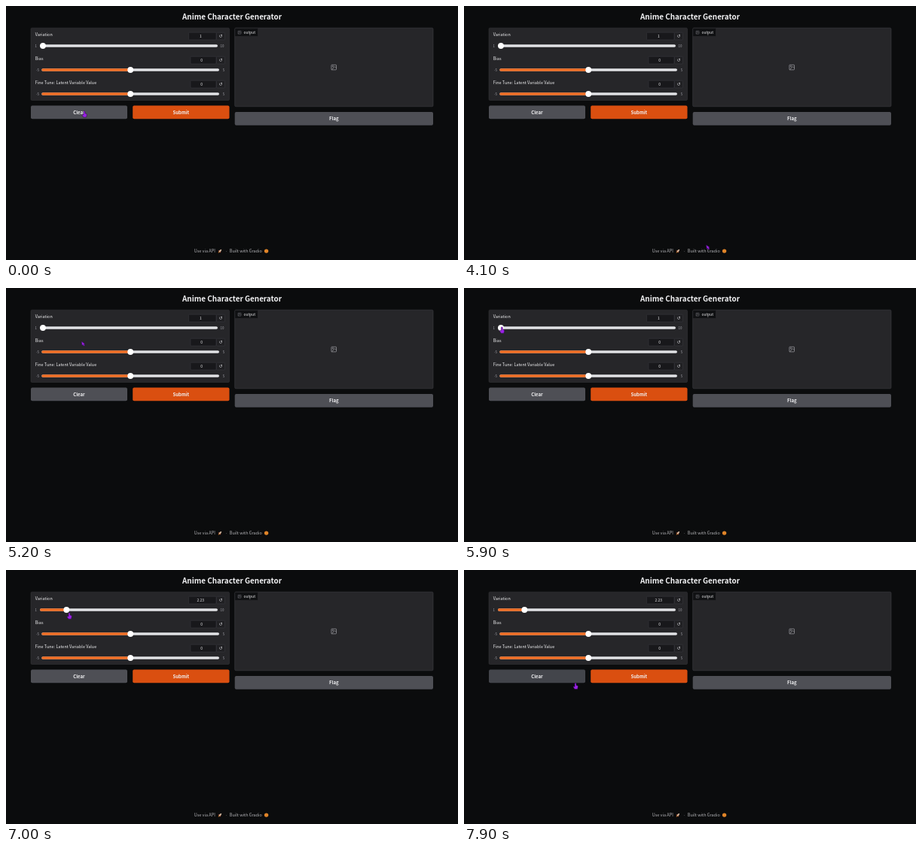
An HTML page for the animation above (8 s loop, 600 px wide and 338 px high).

```html
<!DOCTYPE html>
<html lang="en">
<head>
<meta charset="utf-8">
<title>Anime Character Generator</title>
<style>
  html, body { margin: 0; width: 100%; height: 100%; overflow: hidden; background: #0b0c0d; }
  svg { display: block; width: 100vw; height: 100vh; }
  text { font-family: "Noto Sans CJK JP", "Noto Sans CJK SC", "Noto Sans CJK", "Open Sans", sans-serif; fill: #f1f1f3; white-space: pre; }
  .title { font-size: 9.9px; font-weight: 600; }
  .button { font-size: 6px; font-weight: 600; }
  .label { font-size: 5.5px; }
  .footer { font-size: 5.5px; fill: #b4b4b8; }
  .tag { font-size: 4.85px; }
  .value { font-size: 4.9px; }
  .limit { font-size: 4.4px; fill: #a1a1a8; }
  .reset { font-family: "DejaVu Sans", sans-serif; font-size: 6px; fill: #d4d4d8; }
</style>
</head>
<body>
<svg id="stage" viewBox="0 0 600 338" xmlns="http://www.w3.org/2000/svg"></svg>
<script>
const LOOP = 8000, STEP = 100;
const stage = document.getElementById("stage");

function add(tag, attrs, parent = stage) {
  const el = document.createElementNS("http://www.w3.org/2000/svg", tag);
  for (const key in attrs) el.setAttribute(key, attrs[key]);
  parent.appendChild(el);
  return el;
}

function box(x, y, width, height, fill, rx = 0, stroke = "none") {
  return add("rect", { x, y, width, height, fill, rx, stroke, "stroke-width": 0.5 });
}

function label(content, x, y, cls, anchor = "start") {
  const el = add("text", { x, y, class: cls, "text-anchor": anchor });
  el.textContent = content;
  return el;
}

function button(name, x, y, width, fill) {
  const face = box(x, y, width, 17.7, fill, 2);
  label(name, x + width / 2, y + 11.2, "button", "middle");
  return face;
}

function slider({ name, y, left, right, min, max, value, thumbX, inputX }) {
  label(name, 38.7, y - 12.9, "label");
  box(inputX, y - 17.8, 279 - inputX, 9.8, "#18181b", 1, "#3b3b41");
  box(279.5, y - 17.8, 11, 9.8, "#202023", 1, "#3b3b41");
  const readout = label(value, (inputX + 274) / 2, y - 11.1, "value", "middle");
  label("↺", 285, y - 10.8, "reset", "middle");
  label(min, left - 5.3, y + 1.6, "limit", "middle");
  label(max, right + 6, y + 1.6, "limit", "middle");
  box(left, y - 1.8, right - left, 3.6, "#e1e2e5", 1.8);
  const fill = box(left, y - 1.8, thumbX - left, 3.6, "#ec6a20", 1.8);
  const thumb = add("circle", { cx: thumbX, cy: y, r: 3.9, fill: "#fff" });
  return { readout, fill, thumb, left };
}

// Page
box(0, 0, 600, 338, "#0b0c0d");
label("Anime Character Generator", 300, 18.2, "title", "middle");

box(33, 29.2, 263.5, 96.3, "#262629", 1.5, "#38383d");
const variation = slider({ name: "Variation", y: 53, left: 45, right: 281, min: "1", max: "10", value: "1", thumbX: 49, inputX: 242.5 });
slider({ name: "Bias", y: 85, left: 47.3, right: 283, min: "-5", max: "5", value: "0", thumbX: 165.2, inputX: 245 });
slider({ name: "Fine Tune: Latent Variable Value", y: 117, left: 47.3, right: 283, min: "-5", max: "5", value: "0", thumbX: 165.2, inputX: 245 });

const clearFace = button("Clear", 33, 132.6, 128, "#4e4f55");
button("Submit", 168.2, 132.6, 128.3, "#da4f10");
button("Flag", 303.7, 141, 263.3, "#4e4f55");

box(303.7, 29.2, 263.3, 104.6, "#262629", 1.5, "#46464c");
box(303.9, 29.4, 30.6, 11.2, "#101113", 1, "#303035");
label("output", 315.6, 36.8, "tag");

function pictureIcon(x, y, scale, color) {
  const icon = add("g", { transform: `translate(${x} ${y}) scale(${scale})`, fill: "none", stroke: color, "stroke-width": 0.75 });
  add("rect", { x: -3.3, y: -3.3, width: 6.6, height: 6.6, rx: 0.7 }, icon);
  add("circle", { cx: -1.2, cy: -1.2, r: 0.7 }, icon);
  add("path", { d: "M3.3 1 1.3-1-3 3.3" }, icon);
}
pictureIcon(435.2, 81.6, 1, "#97979d");
pictureIcon(310, 35.2, 0.6, "#85858b");

// Footer
label("Use via API", 249.8, 328.2, "footer");
label("·", 292.5, 328.2, "footer", "middle");
label("Built with Gradio", 296.8, 328.2, "footer");
const rocket = add("g", { transform: "translate(284 326.2) rotate(42)" });
add("path", { d: "M-1-.8-2.1 1.2-.8 1ZM1-.8 2.1 1.2.8 1Z", fill: "#d9532c" }, rocket);
add("path", { d: "M0-3.3Q1.8-1.5.9 1.4H-.9Q-1.8-1.5 0-3.3Z", fill: "#d6b9a0" }, rocket);
add("path", { d: "M-.7 1.5H.7L0 3.4Z", fill: "#f08a24" }, rocket);
add("circle", { cx: 345.6, cy: 326.1, r: 2.7, fill: "#e08428" });

// Pointer shapes, tip at the origin
const pointer = add("g", { fill: "#9b22e6", stroke: "#2a0a45", "stroke-width": 0.5, "stroke-linejoin": "round" });
const arrow = add("path", { d: "M-.7-.5 4 2.8 2.7 3.3 3.8 5 2.5 5.8 1.4 4 .2 5Z" }, pointer);
const hand = add("path", { d: "M-1 .8Q0-.8 1 .8V3.2L2.8 3.7Q3.4 4 3.3 5.2L2.6 8.4H-1.1L-2.9 5.6Q-2.9 4.4-1.8 4.7L-1 5.2Z" }, pointer);

// time, x, y
const path = [
  [0, 104, 139.7], [500, 123, 230.8], [4000, 123, 230.8], [4100, 322.2, 318.4],
  [4200, 329, 319.5], [4300, 329, 319.5], [4900, 250, 133], [5000, 250, 133],
  [5200, 100.8, 71.5], [5400, 42, 65.5], [5500, 42, 65.5], [5900, 50.3, 51.8],
  [6200, 50.3, 51.8], [7000, 84, 56.8], [7300, 84, 56.8], [7900, 148, 150.2]
];

const mix = (a, b, k) => a + (b - a) * k;
const progress = (t, from, to) => Math.min(1, Math.max(0, (t - from) / (to - from)));

function pointerAt(t) {
  const i = Math.max(1, path.findIndex(p => p[0] >= t));
  const [a, b] = [path[i - 1], path[i]];
  const k = progress(t, a[0], b[0]);
  return [mix(a[1], b[1], k), mix(a[2], b[2], k)];
}

function isClickable(x, y) {
  const onButton = y > 132.5 && y < 150.5 && x > 33 && x < 296.5 && (x < 161 || x > 168);
  const onSlider = x > 45 && x < 283 && [53, 85, 117].some(sy => Math.abs(y - sy) < 4.5);
  return onButton || onSlider;
}

function render(time) {
  const t = Math.floor(time % LOOP / STEP) * STEP;
  const [x, y] = pointerAt(t);
  const useHand = isClickable(x, y);
  pointer.setAttribute("transform", `translate(${x} ${y})`);
  hand.style.display = useHand ? "" : "none";
  arrow.style.display = useHand ? "none" : "";

  const value = mix(1, 2.23, progress(t, 6200, 7000));
  const thumbX = 49 + (value - 1) / 9 * 229;
  variation.readout.textContent = +value.toFixed(2);
  variation.thumb.setAttribute("cx", thumbX);
  variation.fill.setAttribute("width", value > 1 ? thumbX - variation.left : 0);
  clearFace.setAttribute("fill", t >= 7800 ? "#43454b" : "#4e4f55");
}

const start = performance.now();
function tick() {
  render(performance.now() - start);
  requestAnimationFrame(tick);
}
tick();
</script>
</body>
</html>
```
